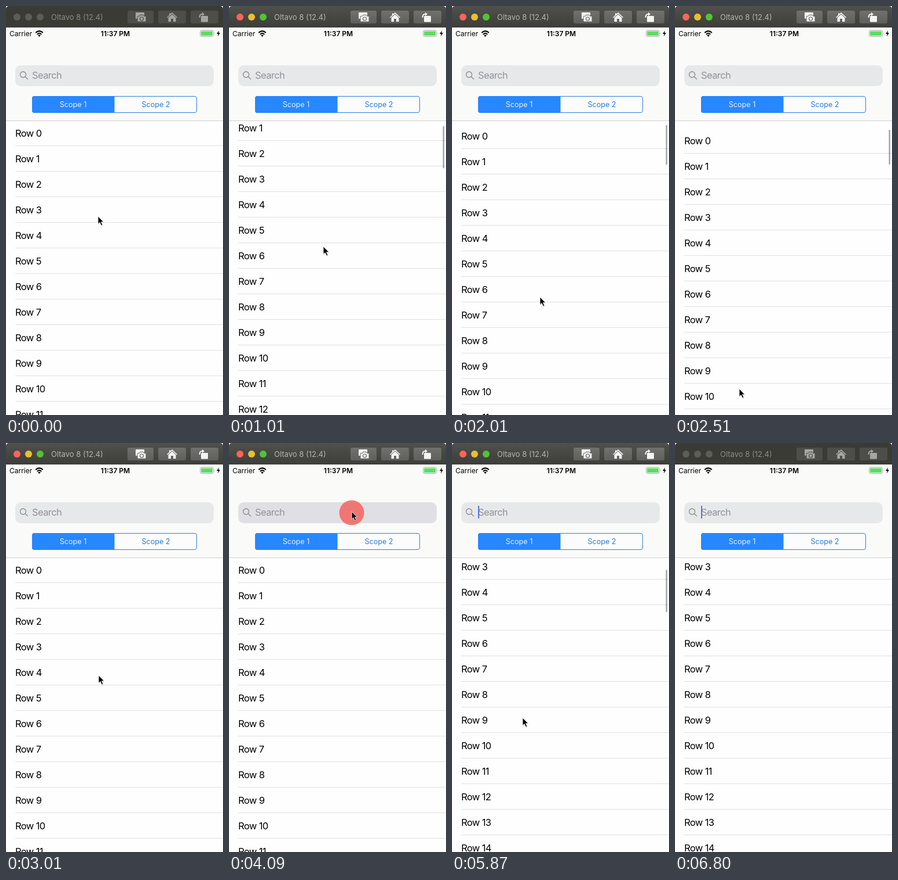
Write an HTML page that moves like this. It is 375x704 px and loops after 7800 ms.

```html
<!DOCTYPE html>
<html lang="en">
<head>
<meta charset="utf-8">
<title>Search bar with scopes</title>
<style>
  html, body { margin: 0; width: 100%; height: 100%; overflow: hidden; background: #fff; }
  svg { display: block; width: 375px; height: 704px; font-family: Inter, Roboto, sans-serif; }
  .row { font-size: 16.5px; letter-spacing: -.6px; }
  .line { fill: #e0e0e2; }
  .bar { fill: #3b3b36; }
  .title { font-size: 13px; fill: #8a8a86; }
  .light { fill: #5d5d58; }
  .button { fill: #4d4d49; }
  .icon { fill: #a5a5a2; }
  .hole { fill: #4d4d49; }
  .cut { stroke: #4d4d49; }
  .active .bar { fill: url(#barFill); }
  .active .title { fill: #b4b4b1; }
  .active .button { fill: url(#buttonFill); }
  .active .icon { fill: #f4f4f3; }
  .active .hole { fill: #666663; }
  .active .cut { stroke: #666663; }
  .active .red { fill: #fb645a; }
  .active .yellow { fill: #e9bf2f; }
  .active .green { fill: #50c435; }
  .status { font-size: 12px; }
  .scope { font-size: 12.6px; text-anchor: middle; }
</style>
</head>
<body>
<svg viewBox="0 0 375 704">
  <defs>
    <linearGradient id="barFill" x2="0" y2="1">
      <stop stop-color="#50504c"/><stop offset="1" stop-color="#3d3d39"/>
    </linearGradient>
    <linearGradient id="buttonFill" x2="0" y2="1">
      <stop stop-color="#70706d"/><stop offset="1" stop-color="#5f5f5c"/>
    </linearGradient>
    <clipPath id="listClip"><rect y="198" width="375" height="506"/></clipPath>
  </defs>

  <rect y="37" width="375" height="667" fill="#fefefe"/>
  <g clip-path="url(#listClip)"><g id="list"></g></g>
  <rect id="scroller" x="369.5" width="2.5" rx="1.25" fill="#000" fill-opacity=".34"/>

  <rect y="37" width="375" height="160" fill="#fafaf9"/>
  <rect y="197" width="375" height="1" fill="#cfcfd1"/>

  <g class="status">
    <text x="6" y="51.5">Carrier</text>
    <text x="189" y="51.5" text-anchor="middle" font-weight="600">11:37 PM</text>
  </g>
  <g fill="none" stroke="#000" stroke-width="2">
    <path d="M51.2 46Q57.5 40.2 63.8 46M53.7 48.9Q57.5 45.2 61.3 48.9"/>
    <path d="M55.2 50.6Q57.5 48.6 59.8 50.6L57.5 53Z" fill="#000" stroke="none"/>
  </g>
  <rect x="335.5" y="42" width="23" height="10.5" rx="2.7" fill="none" stroke="#a9aaa9"/>
  <rect x="337" y="43.5" width="20" height="7.5" rx="1.3" fill="#5cdc65"/>
  <path d="M360 45.4Q361.8 47.2 360 49Z" fill="#a9aaa9"/>
  <path d="M368.2 42L364 48H366.8L365.8 52.4L370 46.2H367.2Z"/>

  <rect id="field" x="16" y="102" width="343" height="36" rx="9.5"/>
  <g fill="none" stroke="#8a8a8f" stroke-width="1.3">
    <circle cx="29.5" cy="118" r="5"/>
    <path d="M33.2 121.8L37.5 125.8" stroke-linecap="round"/>
  </g>
  <text class="row" x="45" y="125" fill="#929297">Search</text>
  <rect id="caret" x="45" y="108" width="2" height="22" rx="1" fill="#4f76de"/>

  <rect x="45.5" y="155.5" width="284" height="28" rx="3.5" fill="#fcfcfc" stroke="#2f7ed8"/>
  <path d="M187.5 155V184H49a4 4 0 0 1-4-4V159a4 4 0 0 1 4-4Z" fill="#2787fe"/>
  <text class="scope" x="116" y="174" fill="#e6f1ff">Scope 1</text>
  <text class="scope" x="259" y="174" fill="#267cdc">Scope 2</text>

  <g id="frame">
    <path class="bar" d="M0 37V5a5 5 0 0 1 5-5H370a5 5 0 0 1 5 5V37Z"/>
    <circle class="light red" cx="19" cy="19" r="6"/>
    <circle class="light yellow" cx="39" cy="19" r="6"/>
    <circle class="light green" cx="59" cy="19" r="6"/>
    <text class="title" x="78" y="24">Oltavo 8 (12.4)</text>
    <rect class="button" x="210" y="8" width="45" height="22" rx="3"/>
    <rect class="button" x="263" y="8" width="48" height="22" rx="3"/>
    <rect class="button" x="319" y="8" width="48" height="22" rx="3"/>
    <g class="icon">
      <rect x="224" y="11" width="15" height="11" rx="1"/>
      <path class="cut" d="M228 17.5H230.5L231.5 15.5H237.5L238.5 17.5H241a1 1 0 0 1 1 1V26a1 1 0 0 1-1 1H228a1 1 0 0 1-1-1V18.5a1 1 0 0 1 1-1Z"/>
      <circle class="hole" cx="234.5" cy="22" r="3.6"/>
      <circle cx="234.5" cy="22" r="2.4"/>
      <path d="M287 11L296 19.5L295 20.5L287 13.2L279 20.5L278 19.5L282 15.7V12.5H284V13.8Z"/>
      <path d="M287 14.5L293.5 20.3V27H289V22H285V27H280.5V20.3Z"/>
      <rect x="337" y="17" width="12" height="10.5" rx="1"/>
      <path d="M333.5 20Q333.5 13 339 13V10.8L343 14L339 17.2V15Q335.5 15 335.5 20Z"/>
    </g>
  </g>

  <g id="pointer">
    <circle id="touch" cy="2" r="21.5" fill="#f36863" fill-opacity=".88"/>
    <g transform="scale(.94)">
      <path d="M.5 1V15.5L4 12.5L6.5 18L9.2 16.8L6.8 11.5H11.4Z" fill-opacity=".15"/>
      <path d="M0 0V14.2L3.3 11.2L5.8 16.8L8.3 15.7L5.9 10.3H10.4Z" stroke="#fff" stroke-width=".9"/>
    </g>
  </g>
</svg>
<script>
const LOOP = 7800, START = 81, FPS = 14, LAST = 6795;
const RUBBER = .47, SETTLE = 115;
const ids = ['list', 'scroller', 'field', 'caret', 'frame', 'pointer', 'touch'];
const [list, scroller, field, caret, frame, pointer, touch] = ids.map(id => document.getElementById(id));

list.innerHTML = Array.from({ length: 18 }, (_, i) => {
  const y = 197 + 44 * i;
  return `<text class="row" x="16" y="${y + 28}">Row ${i}</text>` +
    `<rect class="line" x="16" y="${y + 43}" width="359" height="1"/>`;
}).join('');

const home = { x: 159, y: 362 };
const move = (from, to, x, y) => ({ from, to, x, y });
const drag = (...args) => ({ ...move(...args), drag: true });
const moves = [
  move(90, 390, 165, 467),
  drag(390, 820, 163, 414),
  drag(1080, 1780, 154, 545),
  move(1780, 2000, 152, 501),
  drag(2080, 2330, 126, 625),
  move(2330, 2500, 111, 659),
  move(2590, 2980, 160, 400),
  move(3430, 4020, 212, 118),
  move(4730, 4800, 203, 120),
  move(5080, 5364, 122, 465),
  move(5364, 5510, 118, 611),
  drag(5510, 5830, 122, 473)
];

const ramp = (t, a, b) => Math.min(1, Math.max(0, (t - a) / (b - a)));
const pulse = (t, a, b, c, d) => ramp(t, a, b) - ramp(t, c, d);
const smooth = p => p * p * (3 - 2 * p);

// The list follows each drag, stretches past its top and springs back on release.
function pose(t) {
  let { x, y } = home, shift = 0, released = 0;
  const settle = now => shift > 0 ? shift * Math.exp((released - now) / SETTLE) : shift;
  for (const m of moves) {
    if (t < m.from) break;
    const p = smooth(ramp(t, m.from, m.to));
    const dy = (m.y - y) * p;
    if (m.drag) {
      const base = settle(m.from);
      const raw = (base > 0 ? base / RUBBER : base) + dy;
      shift = raw > 0 ? raw * RUBBER : raw;
      released = Math.min(t, m.to);
    }
    x += (m.x - x) * p;
    y += dy;
  }
  return [x, y, settle(t)].map(Math.round);
}

function draw(t) {
  const [x, y, shift] = pose(t);
  const tapped = t > 4060 && t < 4150;
  const dragged = moves.some(m => m.drag && t >= m.from && t < m.to);
  const press = pulse(t, 4000, 4080, 4160, 4580);
  const blink = t < 5760 ? 0 : pulse((t - 5760) % 1000, 0, 30, 570, 690);

  pointer.setAttribute('transform', `translate(${x} ${y})`);
  pointer.style.visibility = t < 6070 ? 'visible' : 'hidden';
  touch.style.opacity = tapped || dragged ? 1 : 0;

  list.setAttribute('transform', `translate(0 ${shift})`);
  scroller.setAttribute('y', shift > 0 ? 200 + shift : 199 - shift * .14);
  scroller.setAttribute('height', 73 - Math.max(0, shift));
  scroller.style.opacity = pulse(t, 390, 440, 2870, 3010) + pulse(t, 5530, 5580, 5940, 6150);

  field.setAttribute('fill', `rgb(${231 - 7 * press}, ${232 - 8 * press}, ${234 - 6 * press})`);
  caret.style.opacity = pulse(t, 4400, 4500, 5150, 5290) + blink;
  frame.setAttribute('class', t >= 390 && t < LAST ? 'active' : '');
}

const origin = performance.now();
function tick() {
  const t = (performance.now() - origin) % LOOP;
  const step = 1000 / FPS;
  const held = START + Math.floor((t - START) / step) * step;
  draw(t < START ? 0 : Math.min(held, LAST));
  requestAnimationFrame(tick);
}
tick();
</script>
</body>
</html>
```
